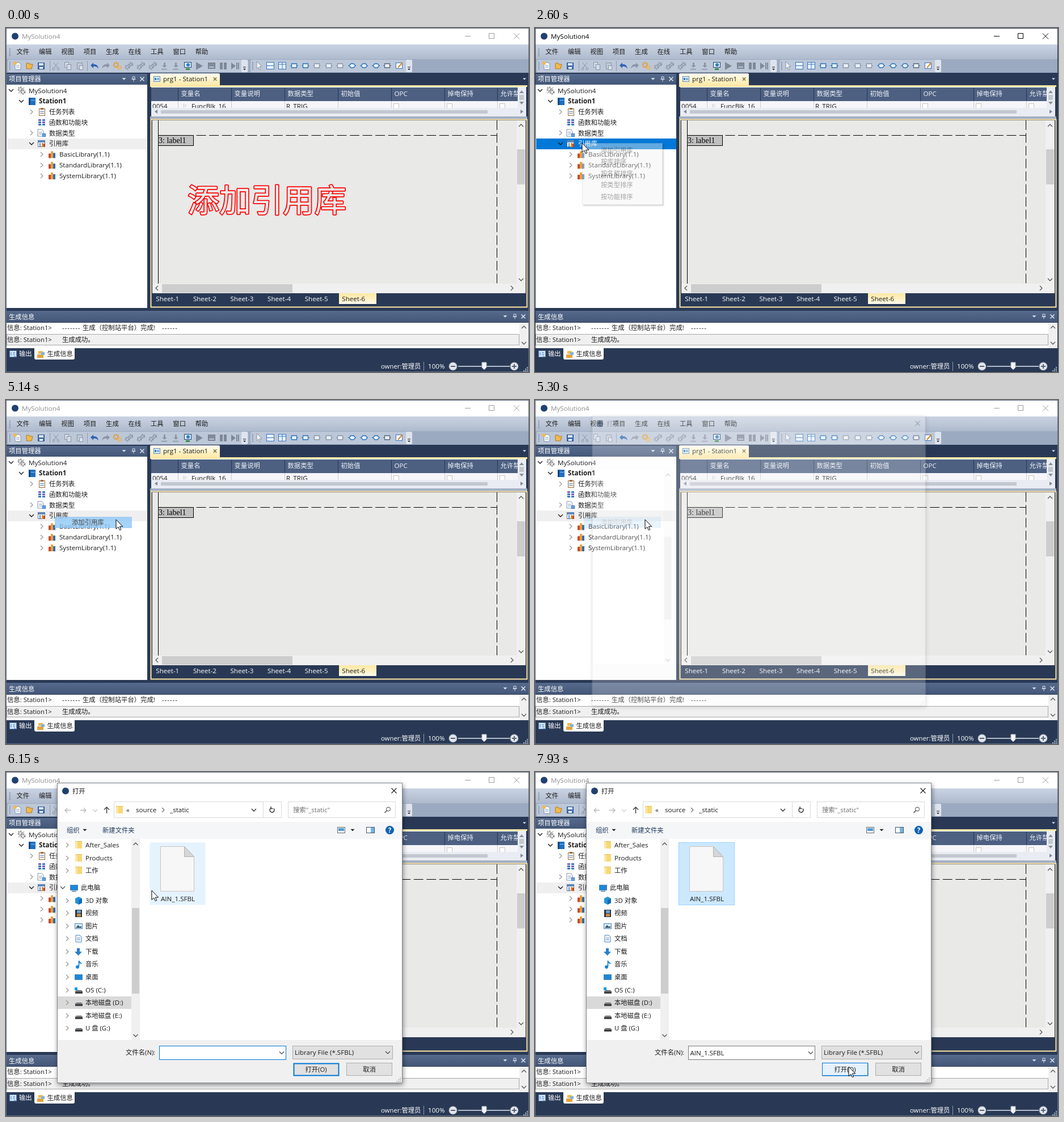
An HTML page for the animation above (8 s loop, 922 px wide and 607 px high).

```html
<!DOCTYPE html>
<html lang="zh-CN">
<head>
<meta charset="utf-8">
<title>MySolution4</title>
<style>
html, body { margin: 0; width: 100%; height: 100%; overflow: hidden; background: #293955; }
svg { display: block; width: 922px; height: 607px; }
text { font-family: "Open Sans", "Noto Sans CJK SC", "Noto Sans CJK", sans-serif; white-space: pre; }
.serif { font-family: "Liberation Serif", serif; }
.shadow { filter: drop-shadow(1px 3px 4px rgba(0, 0, 0, .45)); }
.drop { filter: drop-shadow(2px 2px 1px rgba(0, 0, 0, .4)); }
</style>
</head>
<body>
<svg id="stage" viewBox="0 0 922 607">
  <defs>
    <linearGradient id="bar" x2="0" y2="1"><stop stop-color="#cad3e2"/><stop offset="1" stop-color="#aebacd"/></linearGradient>
    <linearGradient id="head" x2="0" y2="1"><stop stop-color="#566a8d"/><stop offset="1" stop-color="#445778"/></linearGradient>
    <linearGradient id="tab" x2="0" y2="1"><stop stop-color="#fffdf3"/><stop offset=".5" stop-color="#fff3c9"/><stop offset="1" stop-color="#ffe8a6"/></linearGradient>
    <linearGradient id="sheet" x2="0" y2="1"><stop stop-color="#ffe8a6"/><stop offset=".5" stop-color="#fff0bf"/><stop offset="1" stop-color="#fffcf0"/></linearGradient>
  </defs>
</svg>
<script>
const LOOP = 8000;
const NAVY = '#293955', INK = '#1b1b1b', BLUE = '#0078d7', MID = '#2f7fc4', GREY = '#8b96a6', GOLD = '#f2b84b';
let layer = document.getElementById('stage');

function add(tag, attrs) {
  const node = document.createElementNS('http://www.w3.org/2000/svg', tag);
  for (const key in attrs) if (attrs[key] !== undefined) node.setAttribute(key, attrs[key]);
  layer.append(node);
  return node;
}
function group(draw, attrs = {}) {
  const parent = layer, node = add('g', attrs);
  layer = node;
  draw();
  layer = parent;
  return node;
}
function box(x, y, w, h, fill, stroke, extra = {}) {
  const o = stroke ? .5 : 0;
  return add('rect', { x: x + o, y: y + o, width: w - 2 * o, height: h - 2 * o, fill, stroke, ...extra });
}
const path = (d, fill = 'none', stroke, width = 1, extra = {}) =>
  add('path', { d, fill, stroke, 'stroke-width': width, ...extra });
const line = (d, stroke, width = 1, extra) => path(d, 'none', stroke, width, extra);
const disc = (x, y, r, fill, stroke, extra = {}) => add('circle', { cx: x, cy: y, r, fill, stroke, ...extra });
function text(x, y, s, fill = INK, extra = {}) {
  const size = /[\u3400-\u9fff]/.test(s) ? 11.35 : 11.6;
  const node = add('text', { x, y, fill, 'font-size': size, ...extra });
  node.textContent = s;
  return node;
}

// small parts
const CHEVRON = { r: 'M-2-4L2 0L-2 4', l: 'M2-4L-2 0L2 4', d: 'M-4-2L0 2L4-2', u: 'M-4 2L0-2L4 2' };
const at = (x, y) => ({ transform: `translate(${x} ${y})` });
const chevron = (x, y, dir, color = '#555', w = 1.3) => line(CHEVRON[dir], color, w, at(x, y));
const drop = (x, y, color = INK, s = 3.5) => path(`M${x - s} ${y - s / 2}h${2 * s}l${-s} ${s}z`, color);
const cross = (x, y, s, color, w = 1.1) => line(`M${x - s} ${y - s}l${2 * s} ${2 * s}m0 ${-2 * s}l${-2 * s} ${2 * s}`, color, w);
const gear = (x, y, color, r = 3.8) => disc(x, y, r, 'none', color, { 'stroke-width': 3, 'stroke-dasharray': '2.2 1.2' });
const grip = (x, y) => { for (let i = 0; i < 5; i++) box(x, y + i * 3, 1.5, 1.5, '#65758f'); };
const page = (x, y, color = '#7a93b5') => {
  path(`M${x - 5} ${y - 6}h7l3 3v9h-10z`, '#fff', color);
  line(`M${x - 3} ${y - 1}h6m-6 3h6`, color);
};
const folder = (x, y, w = 12, h = 13) => {
  box(x, y, w, h, '#f8d775');
  box(x, y, 4, h, '#fbe6a4');
  line(`M${x} ${y + .5}h${w}`, '#e8be4f');
};
function sizeGrip(x, y, color) {
  for (let i = 0; i < 3; i++) for (let j = 0; i + j < 3; j++) box(x - i * 3, y - j * 3, 2, 2, color);
}
function panelButtons(x, y) {
  drop(x, y, '#dfe6f1');
  line(`M${x + 15} ${y - 4}h4v4h-4zm-1.5 4.5h7m-3.5 0v4`, '#dfe6f1');
  cross(x + 32, y, 3.5, '#dfe6f1', 1.5);
}

// main window
function toolbars() {
  box(1, 29, 920, 26, 'url(#bar)');
  box(1, 55, 920, 24, '#9caac1');
  grip(6, 36);
  '文件 编辑 视图 项目 生成 在线 工具 窗口 帮助'.split(' ').forEach((s, i) => text(18.5 + i * 39.4, 46, s));
  box(3, 56, 424, 22, '#bcc7d8', undefined, { rx: 3 });
  box(431, 56, 285, 22, '#bcc7d8', undefined, { rx: 3 });
  for (const x of [415, 705]) {
    box(x, 56, 11, 22, '#dde4ee', undefined, { rx: 2 });
    line(`M${x + 3} 69h5`, INK);
    drop(x + 5.5, 73, INK, 2.5);
  }
  grip(6, 60); grip(434, 60);
  for (const x of [77, 143]) line(`M${x}.5 58v18`, '#8e9bb1');
  page(21, 67); disc(16, 62, 3, GOLD);
  path('M36 62h5l1 2h5l-2 8h-9z', GOLD, '#a97c25');
  box(56, 61, 12, 12, '#4a74b4', '#294f8a'); box(58, 62, 8, 4, '#dfe9f7'); box(59, 69, 6, 3, '#fff');
  line('M84 61l7 9m1-9l-7 9', GREY); disc(84, 72, 2, 'none', GREY); disc(92, 72, 2, 'none', GREY);
  box(103, 60, 8, 10, '#d4dbe6', GREY); box(107, 64, 8, 10, '#d4dbe6', GREY);
  box(125, 61, 10, 12, '#c0c9d6', GREY); box(129, 66, 7, 8, '#dde3ec', GREY);
  path('M149 66l5-5v3q8-1 9 8q-3-5-9-4v3z', '#2d65b5');
  path('M183 66l-5-5v3q-8-1-9 8q3-5 9-4v3z', GREY);
  gear(194, 65, '#e39a2b'); gear(200, 70, '#f0b24c', 2.8);
  for (const x of [216, 237, 258]) { gear(x - 2, 69, GREY, 3); gear(x + 4, 64, GREY, 2.6); }
  for (const x of [279, 299]) path(`M${x - 1} 61h3v5h3l-4.500 4l-4.500-4h3zM${x - 5} 72h10v1.500h-10z`, GREY);
  box(314, 60, 13, 10, '#d9ecfb', '#23466f'); disc(321, 65, 3, MID); box(317, 71, 7, 3, '#3d8a4b');
  path('M335 60l12 7l-12 7z', '#7f8896');
  box(356, 61, 13, 11, '#828b99', '#737c8a'); box(358, 68, 9, 2, '#b8c2d0');
  for (const x of [377, 384]) box(x, 61, 5, 12, '#7f8896');
  path('M397 61l8 6l-8 6zM406 61h2v12h-2zM409 61h2v12h-2z', '#7f8896');
  path('M442 59v13l3-3l2 5l2-1l-2-5h4z', '#eef2f7', GREY);
  box(459, 60, 14, 13, '#e7f1fc', '#3775bd'); line('M460 66.500h12', '#3775bd');
  box(480, 60, 14, 13, '#e7f1fc', '#3775bd'); line('M487 61v11m-6-8h12', '#3775bd');
  for (const [x, color] of [[508, '#2871b8'], [528, '#2871b8'], [548, GREY], [569, GREY], [589, GREY], [610, '#2871b8'], [631, '#2871b8'], [652, '#2871b8'], [672, '#55687f']]) {
    line(`M${x - 7} 66.500h14`, color);
    const pointed = x > 600 && x < 660;
    path(pointed ? `M${x - 5} 66.500l3-3.500h5l3 3.500l-3 3.500h-5z` : `M${x - 4.5} 63h9v7h-9z`, '#e9f2fb', color, 1.3);
  }
  box(687, 61, 12, 11, '#fff', '#3775bd'); line('M691 70l8-9', '#d58b2c', 2);
}

const books = (x, y) => {
  box(x - 6, y - 2, 4, 8, '#c64a30'); box(x - 2, y - 6, 4, 12, '#f0a030'); box(x + 2, y - 3, 4, 9, '#2f6eb5');
};
let rowGrey, rowBlue, libText, titleText, windowKeys, frameEdge;

function projectPanel() {
  box(1, 81, 248, 19, 'url(#head)');
  text(5, 94, '项目管理器', '#fff');
  panelButtons(208, 90);
  box(1, 100, 248, 394, '#fff');
  rowGrey = box(2, 195, 247, 19, '#efefef');
  rowBlue = box(2, 195, 247, 19, BLUE);
  chevron(9, 110, 'd', INK); chevron(27, 129, 'd', INK); chevron(45, 204, 'd', INK);
  for (const [x, y] of [[45, 148], [45, 185], [63, 223], [63, 242], [63, 261]]) chevron(x, y, 'r', '#999');
  gear(25, 108, '#8d8d8d', 3); gear(30, 113, '#8d8d8d', 3); line('M22 115l10-10', '#aaa', 1.5);
  box(40, 123, 12, 13, '#1f6fc0'); box(40, 123, 3, 13, '#12487f'); line('M44 127.500h7', '#8cc5f5');
  box(58, 142, 11, 13, '#fff7ec', '#9a6c45'); box(61, 141, 5, 3, '#9a6c45'); line('M60 147.500h7m-7 3h7', '#5b83b7');
  for (let i = 0; i < 6; i++) box(57 + i % 2 * 7, 161 + (i >> 1) * 4, 5, 3, i % 3 ? '#3c78c0' : '#7b62b5');
  page(61, 185); box(64, 186, 6, 6, '#6ba5dd', '#3c78c0');
  box(56, 198, 13, 12, '#fff', '#5f7596'); box(57, 199, 11, 3, '#5b8cc4');
  box(59, 203, 2, 6, '#5b8cc4'); box(63, 203, 3, 7, '#e28a2f'); box(66, 204, 3, 6, '#bb4830');
  text(40, 114.5, 'MySolution4');
  text(58, 133, 'Station1', INK, { 'font-weight': 700 });
  ['任务列表', '函数和功能块', '数据类型'].forEach((s, i) => text(76, 152 + i * 18.75, s));
  libText = text(76, 208, '引用库');
  ['Basic', 'Standard', 'System'].forEach((s, i) => {
    books(81, 223.5 + i * 18.75);
    text(94, 227 + i * 18.75, s + 'Library(1.1)');
  });
}

function editor() {
  path('M254 102v-20q0-2 2-2h119q2 0 2 2v20z', 'url(#tab)');
  box(260, 85, 12, 10, '#e7f1fb', '#5c86b5'); box(262, 88, 3, 4, MID); box(266, 88, 4, 4, '#79b0df');
  text(277, 94, 'prg1 - Station1');
  cross(368.5, 90, 2.7, '#75663e', 1.3);
  drop(914, 90, '#dfe6f1', 3);
  box(254, 101, 665, 3, '#ffe8a6');
  box(256, 104, 661, 52, '#f6f6fa');
  box(256, 105, 661, 24, '#4d6082');
  const cols = ['变量名', '变量说明', '数据类型', '初始值', 'OPC', '掉电保持', '允许禁止'];
  cols.forEach((s, i) => {
    const x = 303 + Math.round(i * 93.9);
    line(`M${x}.5 106v22`, '#253653');
    line(`M${x}.5 129v12`, '#c9c9d2');
    text(x + 5.5, 120, s, '#f1f4f9');
    if (i > 3) box(x + 4, 133, 10, 10, '#fff', '#c5c5c5');
  });
  line('M313 134l5 3l-5 3z', '#cfcfcf');
  text(258, 142, '0054'); text(327, 142, 'FuncBlk_16'); text(494, 142, 'R_TRIG');
  box(256, 141, 661, 15, '#e9ecf2');
  box(273, 145, 576, 6, '#c3c7cf');
  path('M267 144v7l-5-3.500z M907 144v7l5-3.500z', '#7d8796');
  box(902, 105, 15, 36, '#e9ecf2');
  box(905, 118, 8, 9, '#c3c7cf');
  path('M905 115h8l-4-5z M905 130h8l-4 5z', '#868e9b');
  box(254, 156, 665, 5, '#a4b0c5');

  box(255, 161, 664, 332, NAVY, '#ffe8a6', { 'stroke-width': 2 });
  box(258, 163, 642, 288, '#e9e9e8');
  const dash = { 'stroke-dasharray': '16.9 5.64' };
  line('M268.500 163V451', '#000');
  line('M268 189.500H865', '#000', 1, dash);
  line('M865.500 163V451', '#000', 1, dash);
  box(268, 189, 63, 19, '#c0c0c0', '#000');
  text(269, 203, '3: label1', '#000', { class: 'serif', 'font-size': 14 });
  box(900, 163, 16, 305, '#f0f0f0');
  box(901, 214, 14, 62, '#cdcdcd');
  box(258, 451, 642, 17, '#f0f0f0');
  box(275, 452, 230, 15, '#cdcdcd');
  chevron(908, 172, 'u'); chevron(908, 444, 'd'); chevron(266, 459, 'l'); chevron(892, 459, 'r');
  box(587, 468, 66, 19, 'url(#sheet)');
  for (let i = 0; i < 6; i++) text(264.3 + i * 65.6, 481.5, 'Sheet-' + (i + 1), i < 5 ? '#fff' : INK);
}

function output() {
  box(1, 499, 920, 20, 'url(#head)');
  text(5, 514, '生成信息', '#fff');
  panelButtons(880, 509);
  box(1, 520, 920, 45, '#fff');
  box(1, 540, 904, 20, '#f0f0f0', '#555', { 'stroke-dasharray': '1 1' });
  const rule = { 'letter-spacing': .9 };
  text(2, 533, '信息: Station1>'); text(99, 533, '-------', INK, rule);
  text(135, 533, '生成（控制站平台）完成!'); text(275, 533, '------', INK, rule);
  text(2, 553.5, '信息: Station1>'); text(99, 553.5, '生成成功。');
  box(905, 520, 16, 45, '#f0f0f0');
  chevron(913, 528, 'u'); chevron(913, 556, 'd');
  box(6, 569, 13, 12, '#d8e8f8', '#5c86b5'); line('M9 572v6m3-5h4m-4 3h4m-2 2l4 3', '#3775bd');
  text(23, 579, '输出', '#fff');
  path('M50 565h71v17q0 3-3 3h-65q-3 0-3-3z', '#fff');
  box(57, 570, 8, 5, GOLD); box(55, 576, 11, 6, '#e3a33c'); box(62, 572, 6, 5, '#7fb1e2');
  text(72.5, 579, '生成信息');
  text(661, 601, 'owner:管理员', '#fff');
  line('M736.500 589v16', '#8d9ab2');
  text(744, 601, '100%', '#fff');
  line('M797 597h91', '#e2e7ef', 1.5);
  for (const x of [788, 896]) {
    disc(x, 597, 7, '#e3e6eb', '#9aa5b5');
    line(`M${x - 4} 597h8` + (x > 800 ? 'm-4-4v8' : ''), '#55627a', 2);
  }
  path('M839 590h8v9l-4 4l-4-4z', '#f4f6f9', '#aab4c4');
  sizeGrip(918, 604, '#a9b4c7');
}

function mainWindow() {
  box(0, 0, 922, 607, NAVY);
  box(1, 1, 920, 28, '#fff');
  disc(16, 14.5, 6, '#1f416f');
  titleText = text(28, 19, 'MySolution4');
  windowKeys = line('M809 14.500h10M851.500 9.500h9v9h-9zM895 9.500l10 10m0-10l-10 10', INK);
  toolbars();
  projectPanel();
  editor();
  output();
  frameEdge = box(0, 0, 922, 607, 'none', '#5d6b82');
}
mainWindow();

const banner = text(320, 323.5, '添加引用库', '#eeeceb', {
  'font-size': 56, 'font-weight': 500, stroke: '#f00', 'stroke-width': 3.4, 'paint-order': 'stroke', 'stroke-linejoin': 'round'
});

// context menu
let menuPick;
const menu = group(() => {
  box(83, 203, 142, 109, '#f2f2f2', '#c4c4c4', { class: 'drop' });
  ['按库排序', '按名称排序', '按类型排序', '按功能排序'].forEach((s, i) => text(116, 240 + i * 20.7, s));
});
const menuItem = group(() => {
  menuPick = box(86, 206, 136, 20, '#91c9f7');
  text(116, 219.5, '添加引用库');
});

// file dialog
let content, arrows, navHover, fileBack, fileName, field, caret, combo, openHover;

function sideIcon(kind, x, y) {
  if (kind === 'dir') return folder(x - 6, y - 7);
  if (kind === 'disk' || kind === 'os') {
    path(`M${x - 6} ${y + 2}l2-2h9l2 2v4h-13z`, '#3f4448');
    box(x - 6, y + 1, 13, 1, '#b5b5b5');
    if (kind === 'os') box(x - 7, y - 5, 5, 5, '#18a0e0');
    return;
  }
  if (kind === 'cube') return path(`M${x - 6} ${y - 4}l6-3l6 3v8l-6 3l-6-3z`, '#2593dc'), path(`M${x} ${y - 1}l6-3v8l-6 3z`, '#136cb5');
  if (kind === 'film') return box(x - 6, y - 6, 12, 13, '#333'), box(x - 3, y - 5, 7, 5, '#62a6da'), box(x - 3, y + 1, 7, 5, '#c58a52');
  if (kind === 'doc') return page(x, y, '#3c7fc0');
  if (kind === 'down') return path(`M${x - 3} ${y - 6}h5v6h4l-6.500 7l-6.500-7h4z`, '#2b7fd0');
  if (kind === 'note') return disc(x - 2, y + 5, 3, '#1684d8'), line(`M${x + .5} ${y + 4}v-10q1 4 5 5`, '#1684d8', 1.8);
  box(x - 7, y - 5, 14, 10, kind === 'photo' ? '#d6ecfa' : '#1b87dc', '#5385b0');
  if (kind === 'photo') path(`M${x - 5} ${y + 3}l4-5l3 3l3-1v3z`, '#35566f');
  if (kind === 'pc') line(`M${x - 4} ${y + 6.5}h8`, '#4e7395', 1.5);
}

function sidebar() {
  const rows = [
    [129, 'dir', 'After_Sales'], [152, 'dir', 'Products'], [174, 'dir', '工作'], [204, 'pc', '此电脑'],
    [227, 'cube', '3D 对象'], [249, 'film', '视频'], [272, 'photo', '图片'], [294, 'doc', '文档'],
    [317, 'down', '下载'], [339, 'note', '音乐'], [362, 'desk', '桌面'], [385, 'os', 'OS (C:)'],
    [407, 'disk', '本地磁盘 (D:)'], [430, 'disk', '本地磁盘 (E:)'], [452, 'disk', 'U 盘 (G:)']
  ];
  navHover = box(91, 193, 130, 23, '#e5f3ff');
  box(91, 396, 130, 22, '#d9d9d9');
  for (const [y, kind, s] of rows) {
    const shift = kind === 'pc' ? 8 : 0;
    sideIcon(kind, 128 - shift, y);
    text(140 - shift, y + 4, s);
  }
  arrows = group(() => rows.forEach(([y, kind]) =>
    kind === 'pc' ? chevron(100, y, 'd', '#555') : chevron(108, y, 'r', '#999')));
}

function dialogContent() {
  for (const [x, s] of [[109, -1], [136, 1]]) line(`M${x - 5} 67.500h10M${x + s} 63.500l${s * 4} 4l${-s * 4} 4`, '#b9b9b9', 1.3);
  chevron(157, 68, 'd', '#aaa', 1);
  line('M177.500 73V62m-4.500 4.500l4.500-4.500l4.500 4.500', '#444', 1.5);
  box(190, 52, 296, 29, '#fff', '#d9d9d9');
  folder(194, 60);
  text(212, 71, '«'); text(229, 71, 'source'); chevron(277, 67, 'r', INK, 1); text(289, 71, '_static');
  chevron(437, 67, 'd', '#444', 1.6);
  line('M453.500 53v27', '#d9d9d9');
  line('M472 64.500a4 4 0 1 1-4.500-1M467 61v3.500h3.500', '#333', 1.4);
  box(497, 52, 190, 29, '#fff', '#d9d9d9');
  text(506, 71, '搜索"_static"', '#6d6d6d');
  disc(674, 65.5, 3.5, 'none', '#444'); line('M671.500 68l-4 4', '#444', 1.4);
  text(107, 107, '组织', '#1e395b'); drop(139, 102.5);
  text(170, 107, '新建文件夹', '#1e395b');
  box(584, 97, 14, 11, '#fff', '#666'); box(586, 99, 10, 5, '#4f9cd6'); drop(611, 102.5);
  box(635, 97, 15, 11, '#fff', '#456'); box(643, 98, 6, 9, '#73b4e6');
  disc(676.5, 102.5, 7.5, '#0f62b5');
  text(676.5, 107, '?', '#fff', { 'text-anchor': 'middle', 'font-weight': 700 });
  sidebar();
  fileBack = box(253, 124, 99, 111, 'none', 'none');
  path('M272.500 131.500h42l17 18v61h-59z', '#f7f7f7', '#c4c4c4');
  path('M314.500 131.500v18h17z', '#d6d6d6', '#b2b2b2');
  text(303, 227.5, 'AIN_1.SFBL', INK, { 'text-anchor': 'middle' });
  text(211, 499, '文件名(N):');
  field = box(270, 483, 224, 25, '#fff', BLUE);
  fileName = text(273.5, 499.5, 'AIN_1.SFBL');
  caret = box(274, 488, 1, 16, '#000');
  chevron(486, 495.5, 'd', '#444', 1.1);
  combo = box(505, 483, 177, 24, '#e1e1e1', '#adadad');
  text(509, 499, 'Library File (*.SFBL)');
  chevron(673, 495, 'd', '#444', 1.1);
  box(507, 514, 80, 22, '#e1e1e1', BLUE, { 'stroke-width': 2 });
  openHover = box(506, 513, 81, 23, '#e5f1fb', BLUE);
  box(600, 513, 81, 23, '#e1e1e1', '#adadad');
  text(546.5, 528.5, '打开(O)', INK, { 'text-anchor': 'middle' });
  text(640.5, 528.5, '取消', INK, { 'text-anchor': 'middle' });
}

const dialog = group(() => {
  box(90, 19, 609, 530, '#fff', '#7f8791', { class: 'shadow' });
  box(91, 88, 607, 30, '#f5f6f7');
  box(91, 473, 607, 75, '#f0f0f0');
  box(221, 118, 15, 355, '#f0f0f0');
  box(222, 240, 13, 151, '#cdcdcd');
  chevron(228.5, 127, 'u'); chevron(228.5, 465, 'd');
  disc(105, 33.5, 6, '#1f416f');
  text(117, 38, '打开');
  cross(684, 33, 4.5, INK);
  sizeGrip(694, 545, '#bfbfbf');
  content = group(dialogContent);
});

const pointer = path('M0 0V16.500L3.800 13L6.400 18.600L8.800 17.600L6.400 12.200H11.700Z', '#fff', '#000');

// motion: start, end, steps, lead, x0, y0, x1, y1, easing power for x and y
const MOVES = [
  [1120, 1900, 11, 0, 494, 564, 81, 196, 2.13, 2.33],
  [2130, 2200, 2, 1, 81, 196, 83, 203, 1, 1],
  [3600, 3900, 5, 1, 83, 203, 184, 210.5, 2.8, 20],
  [4450, 4530, 2, 1, 184, 210.5, 194, 211, 1, 1],
  [6090, 6460, 6, 1, 194, 211, 300, 205, 2.22, 1],
  [6860, 7630, 11, 1, 300, 205, 556, 508, 1.6, 1.6],
  [7700, 7930, 4, 1, 556, 508, 553, 520, 1, 1]
];
// time, opacity, scale
const OPENING = [[0, 0, .94], [5220, .08, .95], [5300, .25, .967], [5380, .6, .985], [5460, .92, .997], [5540, .98, .999], [5620, 1, 1]];
const MENU_IN = [[0, 0], [2600, .4], [2670, .8], [2740, 1], [5140, 0]];
const ITEM_IN = [[0, 0], [2600, .4], [2670, .8], [2740, 1], [5140, .8], [5220, .5], [5300, .25], [5380, 0]];
const ARROWS = [[0, 1], [6630, .85], [6700, .65], [6860, .35], [6940, .15], [7020, 0]];
const OPEN_HOVER = [[0, 0], [7700, .35], [7780, .65], [7850, .85], [7930, 1]];

const pick = (table, t) => table.filter(row => t >= row[0]).pop();
const between = (t, a, b) => t >= a && t < b;
const set = (node, attrs) => { for (const key in attrs) node.setAttribute(key, attrs[key]); };
const show = (node, amount) => set(node, { opacity: Number(amount) });

function pointerAt(t) {
  const move = pick(MOVES, t);
  if (!move) return null;
  const [start, end, n, lead, x0, y0, x1, y1, px, py] = move;
  const step = Math.min(n - 1, Math.floor((t - start) / ((end - start) / (n - 1)) + .2));
  const rest = 1 - (step + lead) / (n - 1 + lead);
  return [x1 + (x0 - x1) * rest ** px, y1 + (y0 - y1) * rest ** py];
}

function render(t) {
  const active = between(t, 2450, 5140), chosen = between(t, 2600, 5140);
  show(banner, t < 500);
  set(titleText, { fill: active ? '#000' : '#8f8f8f' });
  set(windowKeys, { stroke: active ? '#000' : '#9a9a9a' });
  set(frameEdge, { stroke: active ? '#24344f' : '#5d6b82' });
  show(rowGrey, !chosen);
  show(rowBlue, chosen);
  set(libText, { fill: chosen ? '#fff' : INK });

  show(menu, pick(MENU_IN, t)[1]);
  show(menuItem, pick(ITEM_IN, t)[1]);
  show(menuPick, t >= 3600);

  const [, alpha, scale] = pick(OPENING, t);
  set(dialog, { opacity: alpha, transform: `translate(394 284) scale(${scale}) translate(-394 -284)` });
  show(content, t >= 5380);
  show(navHover, t < 6090);
  show(arrows, pick(ARROWS, t)[1]);

  const picked = t >= 6630;
  set(fileBack, { fill: picked ? '#cce8ff' : t >= 6150 ? '#e5f3ff' : 'none', stroke: picked ? '#99d1ff' : 'none' });
  set(field, { stroke: picked ? '#7a7a7a' : BLUE });
  show(fileName, picked);
  show(caret, between(t, 5380, 5920) || between(t, 6450, 6630));
  show(openHover, pick(OPEN_HOVER, t)[1]);

  const spot = pointerAt(t);
  show(pointer, spot !== null);
  if (spot) set(pointer, at(...spot));
  const overCombo = t > 6860 && between(spot[1], 483, 507);
  set(combo, { fill: overCombo ? '#e5f1fb' : '#e1e1e1', stroke: overCombo ? BLUE : '#adadad' });
}

const begin = performance.now();
function tick() {
  render((performance.now() - begin) % LOOP);
  requestAnimationFrame(tick);
}
tick();
</script>
</body>
</html>
```
